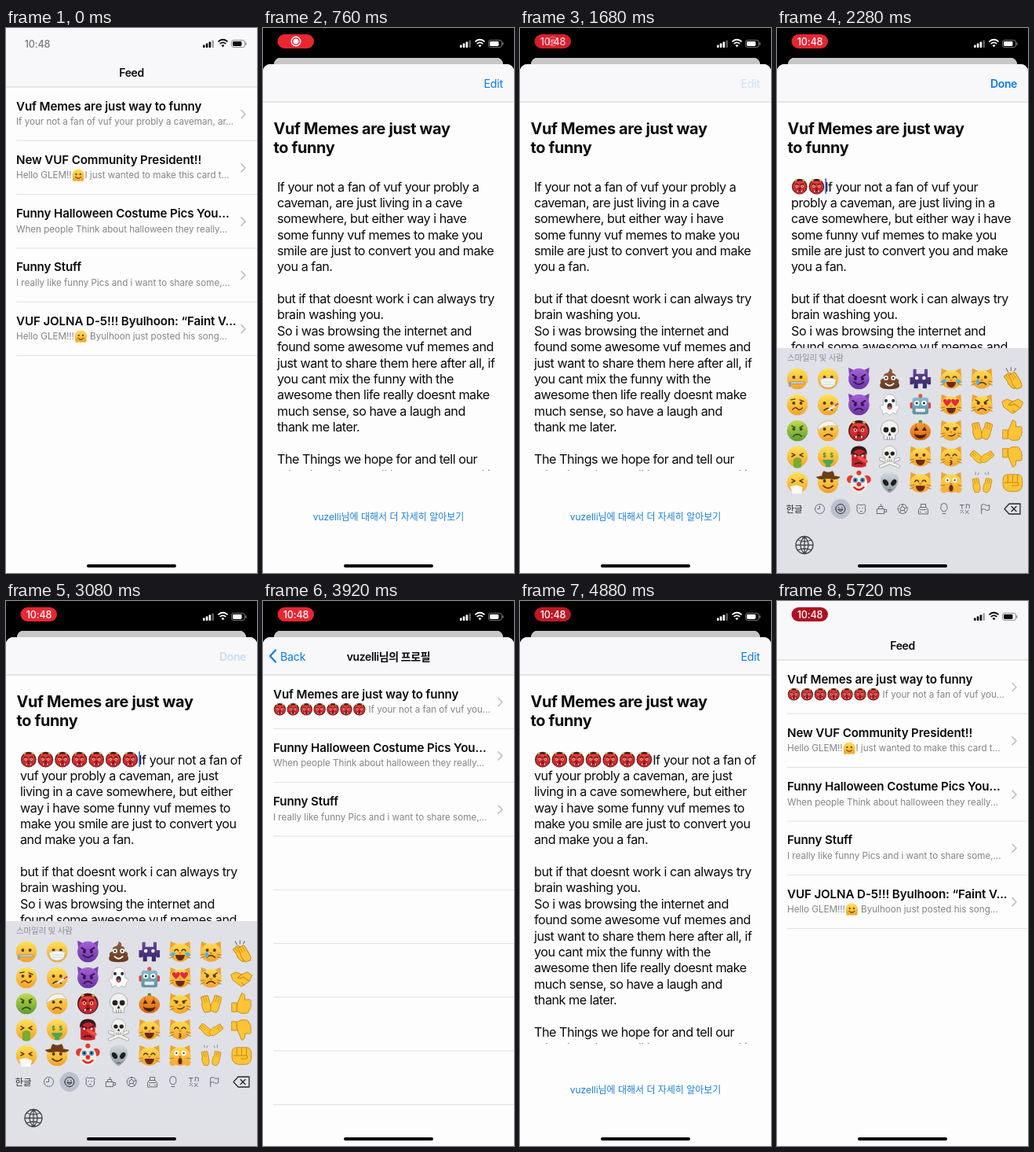
Animation of 320x693 px, one loop 5.76 s. Source, as an HTML page with a canvas:

```html
<!DOCTYPE html>
<html lang="en">
<head>
<meta charset="utf-8">
<title>Feed app recording</title>
<style>
html, body { margin: 0; width: 100%; height: 100%; overflow: hidden; background: #fff; }
canvas { display: block; width: 100%; height: 100%; }
</style>
</head>
<body>
<canvas id="stage"></canvas>
<script>
const W = 320, H = 693, LOOP = 5760, STEP = 40;
const canvas = document.getElementById('stage');
const g = canvas.getContext('2d');
const dpr = window.devicePixelRatio || 1;
canvas.width = W * dpr;
canvas.height = H * dpr;

const SANS = 'Inter, "Noto Sans CJK KR", "Noto Sans CJK JP", sans-serif';
const BLUE = '#0a7cee', INK = '#0b0b0d', PAPER = '#fdfdfe', BAR = '#f8f8fa';

// weight, size, tracking, emoji advance
const STYLE = {
  heading: [700, 19.9, -0.35],
  row: [600, 15.2, -0.14],
  sub: [400, 11.7, -0.04, 16.9],
  body: [400, 16.2, -0.48, 21.6],
  nav: [600, 14, -0.4],
  button: [400, 14.2, -0.2],
  link: [400, 12, -0.02],
  clock: [500, 12.6, -0.2],
  small: [400, 10.5, -0.2],
  key: [400, 11.5, 0],
  sign: [700, 7, 0]
};

let t = 0;
const ramp = (a, b) => Math.min(1, Math.max(0, (t - a) / (b - a)));
const easeOut = p => 1 - (1 - p) ** 3;
const easeBoth = p => p * p * (3 - 2 * p);

// ---------- drawing helpers ----------
function group(fn, x = 0, y = 0, s = 1, alpha = 1) {
  g.save();
  g.translate(x, y);
  g.scale(s, s);
  g.globalAlpha *= alpha;
  fn();
  g.restore();
}
function box(x, y, w, h, c, r = 0) {
  g.fillStyle = c;
  g.beginPath();
  g.roundRect(x, y, w, h, r);
  g.fill();
}
function oval(x, y, rx, ry, c, turn = 0) {
  g.fillStyle = c;
  g.beginPath();
  g.ellipse(x, y, rx, ry, turn, 0, 7);
  g.fill();
}
const disc = (x, y, r, c) => oval(x, y, r, r, c);
function fill(d, c) {
  g.fillStyle = c;
  g.fill(new Path2D(d));
}
function line(d, c, w = 1.4) {
  g.strokeStyle = c;
  g.lineWidth = w;
  g.lineCap = g.lineJoin = 'round';
  g.stroke(new Path2D(d));
}
function setFont(style) {
  const [weight, size, track] = STYLE[style];
  g.font = `${weight} ${size}px ${SANS}`;
  g.letterSpacing = track + 'px';
}
function text(s, x, y, style, c = INK, align = 'left') {
  setFont(style);
  g.textAlign = align;
  g.fillStyle = c;
  g.fillText(s, x, y);
}
// '@' stands for the ogre, '#' for the hugging face
function width(s, style) {
  setFont(style);
  const plain = s.replace(/[@#]/g, '');
  return g.measureText(plain).width + (s.length - plain.length) * (STYLE[style][3] || 0);
}
function rich(s, x, y, style, c) {
  const adv = STYLE[style][3], size = STYLE[style][1];
  for (const part of s.split(/([@#])/)) {
    const pic = { '@': 'ogre', '#': 'hug' }[part];
    if (pic) emoji(pic, x + adv / 2, y - size * 0.36, adv * 0.455);
    else text(part, x, y, style, c);
    x += width(part, style);
  }
}

// ---------- emoji, drawn in a 13 unit radius ----------
const DARK = '#5a3412';
function shade(a, b) {
  const s = g.createLinearGradient(0, -13, 0, 13);
  s.addColorStop(0, a);
  s.addColorStop(1, b);
  return s;
}
const gold = () => shade('#ffe257', '#f2a22a');
const face = (c = gold()) => disc(0, 0, 13, c);
const eyes = (c = DARK, y = -2, r = 1.9) => { disc(-4.5, y, r, c); disc(4.5, y, r, c); };
const frown = (c = DARK) => line('M-5 7q5-5 10 0', c, 1.7);
const smile = (c = DARK) => line('M-6 4q6 6 12 0', c, 1.7);
const squint = (c = DARK) => line('M-7-4l4 2-4 2M7-4l-4 2 4 2', c);
const plain = (...more) => { face(); eyes(); more.forEach(m => m()); };
const heart = (x, y) => group(() => fill('M0 4Q-8-3-3-5Q0-5 0-2Q0-5 3-5Q8-3 0 4z', '#e5283c'), x, y);
function imp(mouth) {
  fill('M-12-4l-1-10 8 4zM12-4l1-10-8 4z', '#7d3fb4');
  face(shade('#a562d6', '#6b33a4'));
  line('M-8-5l5 3M8-5l-5 3', '#34114f', 1.8);
  eyes('#34114f', 0);
  mouth('#34114f');
}
function cat(mouth = smile, look = eyes) {
  fill('M-13 1L-12-13-3-9zM13 1L12-13 3-9z', '#eda32e');
  oval(0, 1, 13, 11.5, gold());
  look();
  fill('M-2 1h4l-2 2z', '#c4703a');
  mouth();
  line('M-13 4l5-1M-13 8l5-2M13 4l-5-1M13 8l-5-2', '#a86a20', 0.8);
}
const grin = () => fill('M-6 4h12q-1 7-6 7t-6-7z', '#6b2a1a');
const happy = () => line('M-7-1q2.500-4 5 0M2-1q2.500-4 5 0', DARK);
const HAND = '#fbc536', EDGE = '#c98716';
function shape(d, c = HAND, edge = EDGE) { fill(d, c); line(d, edge, 0.9); }
function palm(x, turn) {
  group(() => {
    g.rotate(turn);
    shape('M-4 9Q-7 1-4-4V-10q2-2 3 0q2-2 3 0q2-2 3 1V2Q5 8 2 10z');
    line('M-1-9v6M2-9v6', EDGE, 0.7);
  }, x, 1);
}
function thumb() {
  shape('M-5-1L0-13q5 0 4 8h6q3 1 1 4q2 2 0 5q1 3-2 4q0 4-4 4h-6l-5-3z');
  shape('M-12-1h6v11h-6z');
}
function skull() {
  shape('M-11-2a11 11 0 0 1 22 0q0 6-4 7v6h-14v-6q-4-1-4-7z', '#f1f1ee', '#a8a8a8');
  eyes('#222', -1, 3.3);
  fill('M0 2l2 4h-4z', '#222');
  line('M-3 8v3M0 8v3M3 8v3', '#777', 0.8);
}

const PICS = {
  hug() { plain(smile); oval(-8, 9, 4, 4.5, '#f6b52f', 0.5); oval(8, 9, 4, 4.5, '#f6b52f', -0.5); line('M-11 6l3 3M11 6l-3 3', '#b8721a', 1); },
  zip() { plain(() => line('M-8 5H8', '#8c9094', 3), () => line('M-8 5H8', '#e4e6e8', 1)); box(-11, 4, 3, 6, '#9a9ea2', 1); },
  woozy() { plain(() => line('M-6 6q3-4 6-1t6-1', DARK), () => line('M-8-6l5-1M3-6l5 2', DARK)); },
  sick() { face(shade('#c4dc52', '#5c9c2e')); eyes('#3b4a12'); line('M-7-6l4 2M7-6l-4 2', '#3b4a12'); frown('#3b4a12'); },
  vomit() { face(); squint(); fill('M-5 3q5-4 10 0v10q-5 3-10 0z', '#79ac2f'); },
  sneeze() { face(); squint(); fill('M-9 5l8-2 8 3-2 8h-11z', '#f7f9fa'); },
  mask() { plain(); shape('M-10 1q10-4 20 0l-2 7q-8 6-16 0z', '#f3f6f8', '#b9c6cc'); line('M-7 4h14M-6 7h12', '#c7d2d7', 0.8); },
  fever() { plain(frown, () => line('M1 6l10-6', '#eef2f4', 2.5), () => line('M9 1l3-2', '#d8303c', 2)); },
  bandage() { plain(frown); shape('M-13-3Q-8-14 6-12L12-5Q0-9-13-1z', '#f5f3ea', '#c4bfae'); },
  money() { face(); text('$', -4.5, 1, 'sign', '#2f8a3a', 'center'); text('$', 4.5, 1, 'sign', '#2f8a3a', 'center'); fill('M-7 4h14q-2 6-4 5v4h-6v-4q-3 0-4-5z', '#4ca84e'); },
  cowboy() { plain(smile); fill('M-15-7Q0-11 15-7Q12-2 0-5Q-12-2-15-7zM-8-7q1-9 4-7q4 2 8 0q3-2 4 7z', '#6b3d1e'); },
  imp() { imp(smile); },
  devil() { imp(frown); },
  ogre() {
    face('#4a1c1c');
    oval(0, 0.8, 11.4, 11.6, shade('#ee4440', '#c01e2a'));
    fill('M-9-8Q0-15 9-8Q0-11-9-8z', '#3a1816');
    fill('M-8-8l0-5 4 3zM8-8l0-5-4 3z', '#e9b64a');
    line('M-7-4q3-2 5 1M7-4q-3-2-5 1', '#4a1214', 1.5);
    eyes('#fbe9c0', -0.5, 2); eyes('#220c0c', -0.5, 1.1);
    oval(0, 3, 2.6, 1.6, '#9a1420');
    line('M-5 8q5-4 10 0', '#4a0c12', 2);
    fill('M-5 7l1.500 3 1.500-4zM5 7l-1.500 3-1.500-4z', '#fff6d6');
  },
  goblin() {
    fill('M-9 12V-6q3-8 9-7q6-1 9 7V12q-9 3-18 0z', '#c8222c');
    fill('M-10-2Q-11-13 0-13T10-2Q6-10 0-9T-10-2z', '#2d1c1c');
    line('M-7-4l5 2M7-4l-5 2', '#2d1c1c', 2);
    eyes('#fff', -1, 1.4);
    line('M0 1l9 5', '#ef5147', 4);
    line('M-5 9q5-2 9 0', '#2d1c1c', 1.6);
  },
  clown() { disc(-10, -4, 5, '#e23a30'); disc(10, -4, 5, '#e23a30'); oval(0, 1, 10.5, 12, '#f7e9dc'); eyes('#3e8fd0', -3, 3); eyes('#222', -3, 1.3); disc(0, 2, 2.8, '#e02a2a'); line('M-6 6q6 6 12 0', '#d5282c', 2.2); disc(0, -12, 3, '#e23a30'); },
  heap() { fill('M0-13q5 2 3 6q6 1 4 6q6 2 4 6q5 8-11 8t-11-8q-2-4 4-6q-2-5 4-6q3-2 3-6z', shade('#96603f', '#63381f')); eyes('#fff', -1, 2.8); eyes('#222', -1, 1.2); line('M-5 6q5 5 10 0', '#fff', 1.8); },
  ghost() { shape('M-8 12q-1-6-4-8q0-4 4-3V-4a8 9 0 0 1 16 0v5q4-1 4 3q-3 2-4 8l-4-2-4 3-4-3z', '#fafafa', '#b5b5bb'); eyes('#333', -5, 2); oval(0, 2, 3, 4, '#333'); oval(0, 4, 2, 2, '#e7616e'); },
  skull,
  bones() { line('M-11 3L11 12M11 3L-11 12', '#8d8d8a', 4.4); line('M-11 3L11 12M11 3L-11 12', '#efefec', 3.2); group(skull, 0, -3, 0.8); },
  alien() { fill('M0 13C-9 8-12-1-11-5a11 8.500 0 0 1 22 0C12-1 9 8 0 13z', shade('#d5dbdd', '#8d989d')); oval(-5, 0, 3, 4.5, '#1c2022', -0.6); oval(5, 0, 3, 4.5, '#1c2022', 0.6); line('M-2 9h4', '#40484b', 1); },
  invader() { fill('M-9-6h18v12h-18zM-13-2h4v9h-4zM9-2h4v9h-4zM-9-12h4v6h-4zM5-12h4v6h-4zM-8 6h5v6h-5zM3 6h5v6h-5z', shade('#6a489f', '#33245f')); eyes('#fff', -1, 2.2); },
  robot() { box(-13, -3, 26, 8, '#d8433f', 2); box(-10, -9, 20, 21, shade('#8fc5d3', '#5a8d9f'), 3); disc(0, -11, 2.5, '#e0504a'); eyes('#fff', -2, 3.2); eyes('#23363d', -2, 1.5); box(-6, 5, 12, 4, '#e8eef0', 1); },
  pumpkin() { box(-2, -13, 4, 6, '#4f8b35', 1); oval(0, 1, 13, 11, shade('#f9a332', '#d9641b')); line('M-5-8q-4 9 0 19M5-8q4 9 0 19', '#c95f17', 0.9); fill('M-8 0l3-5 3 5zM8 0l-3-5-3 5zM-8 4q8 3 16 0q-3 6-8 6t-8-6z', '#4a2208'); },
  cat() { cat(grin); },
  catGrin() { cat(grin, happy); },
  catJoy() { cat(grin, happy); oval(-9, 3, 3, 2.2, '#4ab4ee', -0.6); oval(9, 3, 3, 2.2, '#4ab4ee', 0.6); },
  catLove() { cat(grin, () => { heart(-5, -2); heart(5, -2); }); },
  catSly() { cat(() => line('M-3 6q5 2 8-2', DARK), () => { eyes(); line('M-8-4l5 1M8-4l-5 1', DARK); }); },
  catKiss() { cat(() => line('M-1 5q4 1 0 2.500q4 1 0 2.500', DARK), happy); },
  catScream() { cat(() => oval(0, 7, 2.5, 4, '#6b2a1a'), () => { eyes('#fff', -3, 3); eyes(DARK, -3, 1.1); }); disc(-9, 9, 4, '#f4b23a'); disc(9, 9, 4, '#f4b23a'); },
  catCry() { cat(frown); oval(-5, 4, 2, 3.5, '#48b0ec'); },
  catPout() { cat(frown, () => { eyes(); line('M-8-6l5 3M8-6l-5 3', DARK); }); },
  palms() { palm(-6, -0.25); palm(6, 0.25); },
  open() { group(() => palm(0, -0.9), -6, 0, 0.85); group(() => palm(0, 0.9), 6, 0, 0.85); },
  raise() { group(() => { palm(-8, -0.2); palm(8, 0.2); }, 0, 3, 0.85); line('M-8-13v3M-4-12l-1 2M8-13v3M4-12l1 2', '#9b9ca0', 1.2); },
  clap() { group(() => { palm(-1, -0.7); palm(4, -0.55); }, 0, 2); line('M-8-13l2 4M-2-14v4M4-13l-2 3', '#77787c', 1.2); },
  shake() { shape('M-13-4l6-3 7 3 7-3 6 4-3 7-8 6q-3 2-5-1l-8-6z'); line('M0-4l-5 4 3 1 4-2 7 5M0 7l3 2', EDGE, 1); },
  thumb,
  thumbDown() { g.scale(1, -1); thumb(); },
  fist() { shape('M-12-4q0-6 6-6h13q5 1 5 7v7q-1 7-8 7h-8q-7-1-8-8z'); line('M-6-9v8M0-9v8M6-9v8M-10 0H6q3 2 0 4h-7', EDGE, 1); }
};
function emoji(name, x, y, r) { group(PICS[name], x, y, r / 13); }

const KEYS = ['zip woozy sick vomit sneeze', 'mask fever bandage money cowboy', 'imp devil ogre goblin clown',
  'heap ghost skull bones alien', 'invader robot pumpkin cat catGrin', 'catJoy catLove catSly catKiss catScream',
  'catCry catPout palms open raise', 'clap shake thumb thumbDown fist'].map(s => s.split(' '));

// ---------- screens ----------
const OGRES = '@'.repeat(7);
const MEMES = ['Vuf Memes are just way to funny', 'If your not a fan of vuf your probly a caveman, ar...'];
const MEMES_NEW = [MEMES[0], OGRES + ' If your not a fan of vuf you...'];
const COSTUME = ['Funny Halloween Costume Pics You...', 'When people Think about halloween they really...'];
const STUFF = ['Funny Stuff', 'I really like funny Pics and i want to share some,...'];
const PRESIDENT = ['New VUF Community President!!', 'Hello GLEM!!#I just wanted to make this card t...'];
const SONG = ['VUF JOLNA D-5!!! Byulhoon: “Faint V...', 'Hello GLEM!!!# Byulhoon just posted his song...'];
const OPENING = 'If your not a fan of vuf your probly a caveman, are just living in a cave somewhere, but either way i have some funny vuf memes to make you smile are just to convert you and make you a fan.';
const REST = ['but if that doesnt work i can always try', 'brain washing you.', 'So i was browsing the internet and',
  'found some awesome vuf memes and', 'just want to share them here after all, if', 'you cant mix the funny with the',
  'awesome then life really doesnt make', 'much sense, so have a laugh and', 'thank me later.', '',
  'The Things we hope for and tell our', 'other loved ones all have some good in'];
const ROW = 68.3;

function rows(items, top) {
  items.forEach(([title, sub], i) => {
    const y = top + i * ROW;
    text(title, 13, y + 29.5, 'row');
    rich(sub, 13, y + 48, 'sub', '#84848a');
    line(`M300 ${y + 29.5}l5 5-5 5`, '#c2c2c6', 1.7);
  });
}
function rules(n, top) {
  for (let i = 1; i <= n; i++) box(13, top + i * ROW - 0.5, W, 1, '#e1e1e4');
}
function bar(y, h) {
  box(0, y, W, h, BAR);
  box(0, y + h - 0.5, W, 1, '#d3d3d6');
}

function feed() {
  box(0, 0, W, H, PAPER);
  bar(0, 75);
  text('Feed', 160, 61.5, 'nav', INK, 'center');
  if (t >= 120 && t < 700) box(0, 75.5, W, ROW - 0.5, '#dcdce0');
  rows([t < 3000 ? MEMES : MEMES_NEW, PRESIDENT, COSTUME, STUFF, SONG], 75);
  rules(5, 75);
}

function wrap(s, limit) {
  const lines = [''];
  for (const word of s.split(' ')) {
    const last = lines.length - 1;
    const next = lines[last] ? lines[last] + ' ' + word : word;
    if (width(next, 'body') > limit) lines.push(word);
    else lines[last] = next;
  }
  return lines;
}

function article() {
  box(0, 46, W, H, PAPER);
  text('Vuf Memes are just way', 13.5, 134.5, 'heading');
  text('to funny', 13.5, 158.5, 'heading');
  const typed = t < 2120 ? 0 : Math.min(7, 1 + Math.floor((t - 2120) / 130));
  g.save();
  g.beginPath();
  g.rect(0, 180, W, 382.5);
  g.clip();
  [...wrap('@'.repeat(typed) + OPENING, 285), '', ...REST].forEach((s, i) => rich(s, 18, 207.5 + i * 20.37, 'body', INK));
  g.restore();
  if (t >= 1760 && t < 3120) box(18 + typed * 21.6, 191, 1.8, 20, '#3a6fe0', 1);
  text('vuzelli님에 대해서 더 자세히 알아보기', 160, 625.5, 'link', '#1a80dd', 'center');
}

function profile() {
  box(0, 46, W, H, PAPER);
  rows([MEMES_NEW, COSTUME, STUFF], 94);
  rules(8, 94);
}

function sheet() {
  const push = easeBoth(ramp(3440, 3800)) * (1 - easeBoth(ramp(4300, 4640)));
  if (push < 1) group(article, -96 * push);
  if (push > 0) group(profile, W * (1 - push));
  bar(46, 48);
  const edit = t < 3000 ? 1 - ramp(1590, 1700) : ramp(3140, 3300);
  const done = ramp(1760, 1900) * (1 - ramp(2990, 3105));
  group(() => text('Edit', 306, 75.5, 'button', BLUE, 'right'), 0, 0, 1, edit * (1 - push));
  group(() => text('Done', 306, 75.5, 'nav', BLUE, 'right'), 0, 0, 1, done);
  group(() => text('vuzelli님의 프로필', 160, 75.5, 'nav', INK, 'center'), 120 * (1 - push), 0, 1, push);
  group(() => {
    line('M16 62.500l-7 7.500 7 7.500', BLUE, 2.3);
    text('Back', 22, 75.5, 'button', BLUE);
  }, 30 * (1 - push), 0, 1, push);
  const up = easeOut(ramp(1720, 2000)) * (1 - easeBoth(ramp(3100, 3360)));
  if (up > 0) group(keyboard, 0, (1 - up) * 286);
}

const ICONS = [
  'M-6 0a6 6 0 1 0 12 0a6 6 0 1 0-12 0M0-4V0H-3',
  'M-6 0a6 6 0 1 0 12 0a6 6 0 1 0-12 0M-2-2v.5M2-2v.5M-3 1q3 4 6 0z',
  'M-5-2a2 2 0 1 1 3-3h4a2 2 0 1 1 3 3q2 8-5 8t-5-8M-2-1v.5M2-1v.5M-1 3h2',
  'M-6 0H3V6H-6zM3 1h3v3h-3M-4 0v-3h5v3M-1-3v-3',
  'M-6 0a6 6 0 1 0 12 0a6 6 0 1 0-12 0M-3-1l3-2 3 2-1 3h-4zM0-3v-3M3-1l3-1M-2 2l-2 3M2 2l2 3',
  'M-6 6V1l2-3h8l2 3v5zM-4 1h8M-4 4h1M3 4h1M-3-2v-4h6v4',
  'M-2 3q-3-3-2-6a4 4 0 0 1 8 0q1 3-2 6zM-2 6h4',
  'M-6-5h5M-3.500-5v5M2-1v-5l4 1v4M-5 5l3-3M1 2l4 4M5 2l-4 4M-5 2h.5M-2 5h.5',
  'M-5 6V-5q3-2 5 0t5 0v6q-3 2-5 0t-5 0'
];
function keyboard() {
  box(0, 407, W, H, '#dfe1e6');
  text('스마일리 및 사람', 13, 423, 'small', '#8b8e95');
  KEYS.forEach((col, i) => col.forEach((name, j) => emoji(name, 26 + i * 39.2, 446 + j * 33, 13.3)));
  text('한글', 11.5, 615.5, 'key', '#26272a');
  disc(81, 611.5, 12.5, '#bac1cd');
  ICONS.forEach((d, i) => group(() => line(d, i === 1 ? '#24262a' : '#666a71', 1), 54.5 + i * 26.4, 611.5));
  line('M290 611.500l6-6.500h14v13h-14zM299 608.500l6 6M305 608.500l-6 6', '#26272a', 1.3);
  group(() => line('M-11 0a11 11 0 1 0 22 0a11 11 0 1 0-22 0M-11 0h22M0-11v22M0-11q-10 11 0 22q10-11 0-22M-8.500-6.500q8.500 4 17 0M-8.500 6.500q8.500-4 17 0', '#45474c', 1.3), 35, 657.5);
}

function status(c) {
  for (let i = 0; i < 4; i++) {
    group(() => box(251 + i * 3.8, 21.5 - i * 2, 2.6, 3.5 + i * 2, c, 0.7), 0, 0, 1, i < 3 ? 1 : 0.35);
  }
  group(() => {
    line('M-5.500-5.500q5.500-4.500 11 0M-3.300-2.800q3.300-2.600 6.600 0', c, 1.7);
    fill('M0 2l-2-2.500q2-1.500 4 0z', c);
  }, 276.5, 22.5);
  group(() => {
    g.strokeStyle = c;
    g.lineWidth = 0.9;
    g.beginPath();
    g.roundRect(287.5, 15.5, 17, 9, 2.6);
    g.stroke();
    box(305.3, 18.3, 1.3, 3.4, c, 0.7);
  }, 0, 0, 1, 0.5);
  box(289, 17, 11.5, 6, c, 1.4);

  // recording pill, pulsing between dark and bright red
  const glow = 0.5 + 0.5 * Math.cos((t - 3100) / 780 * 2 * Math.PI);
  const mix = (a, b) => Math.round(a + (b - a) * glow);
  const red = `rgb(${mix(160, 234)},${mix(14, 38)},${mix(30, 50)})`;
  group(() => text('10:48', 40, 24.5, 'clock', INK, 'center'), 0, 0, 1, 0.53 * (1 - ramp(0, 160)));
  group(() => box(18.5, 8, 46.5, 18, red, 9), 0, 0, 1, ramp(40, 240));
  group(() => {
    line('M-5.800 0a5.800 5.800 0 1 0 11.600 0a5.800 5.800 0 1 0-11.600 0', '#fff', 1.4);
    disc(0, 0, 3.5, '#fff');
  }, 42, 17, 1, ramp(140, 320) * (1 - ramp(1440, 1780)));
  group(() => text('10:48', 42, 21.5, 'clock', '#fff', 'center'), 0, 0, 1, ramp(1460, 1740));
}

function draw() {
  g.setTransform(dpr, 0, 0, dpr, 0, 0);
  const open = easeOut(ramp(160, 700)) * (1 - easeBoth(ramp(4920, 5400)));
  box(0, 0, W, H, '#000');
  const s = 1 - 0.0875 * open;
  group(() => {
    g.beginPath();
    g.roundRect(0, 0, W, H, 9 * open);
    g.clip();
    feed();
    box(0, 0, W, H, `rgba(0,0,0,${0.2 * open})`);
  }, W * (1 - s) / 2, 38 * open, s);
  if (open > 0) group(() => {
    g.beginPath();
    g.roundRect(0, 46, W, H, 9);
    g.clip();
    sheet();
  }, 0, (1 - open) * (H - 46));
  status(open > 0.5 ? '#fff' : '#0b0b0d');
  box(103, 682, 114, 4, '#000', 2);
}

const start = performance.now();
function tick() {
  t = Math.floor((performance.now() - start) % LOOP / STEP) * STEP;
  draw();
  requestAnimationFrame(tick);
}
tick();
</script>
</body>
</html>
```
